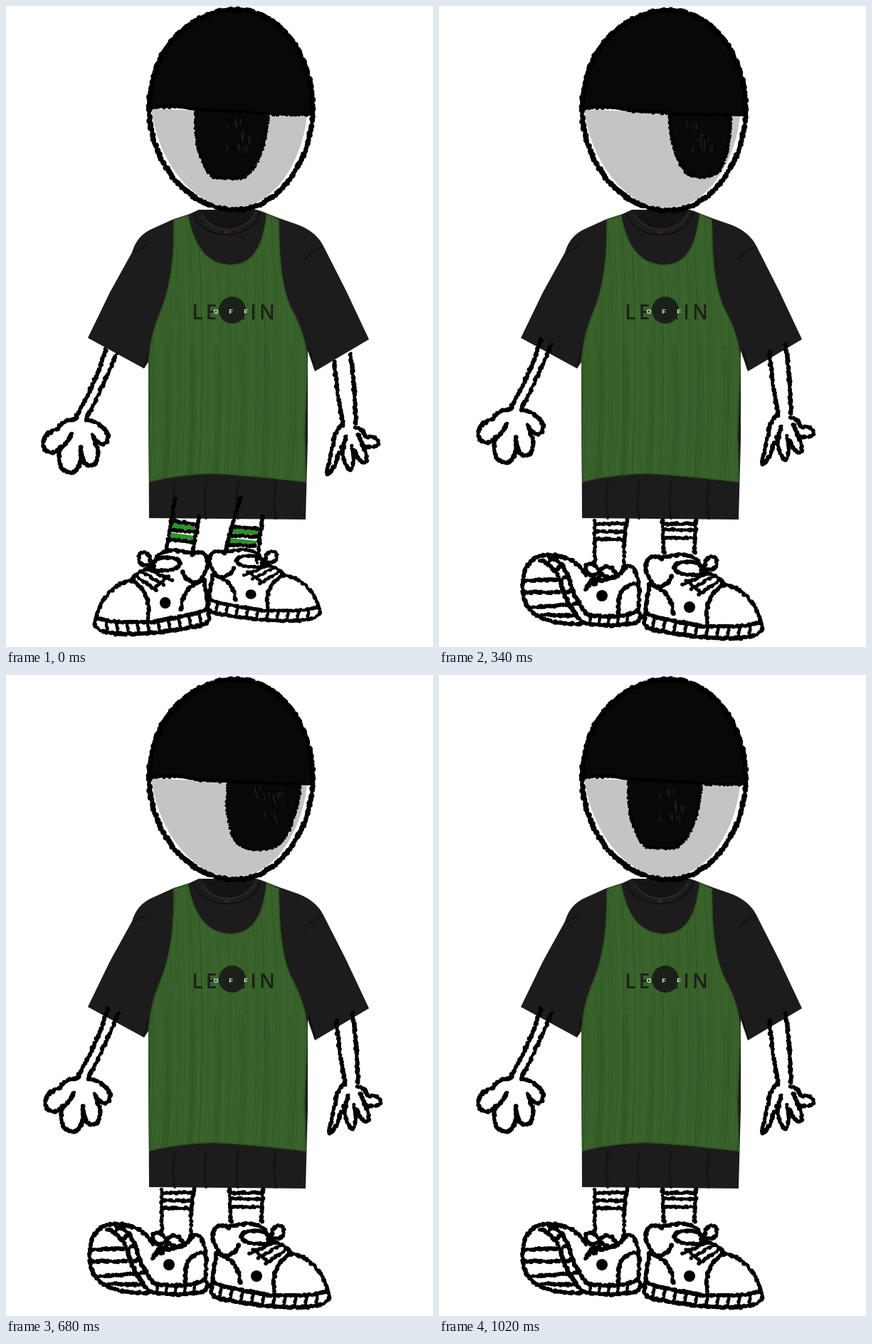
An HTML page with a canvas for the animation above (1190 ms loop, 600 by 900 pixels).

```html
<!DOCTYPE html>
<html lang="en">
<head>
<meta charset="utf-8">
<title>Walking figure</title>
<style>
html, body { margin: 0; width: 100%; height: 100%; overflow: hidden; background: #fff; }
canvas { display: block; width: 600px; height: 900px; }
</style>
</head>
<body>
<canvas id="stage" width="600" height="900"></canvas>
<script>
const STEP = 170;
const INK = '#000', CLOTH = '#1d1c1c', GREEN = '#3b642c', GREY = '#c4c4c2';
const PRINT = '#1b211a', SOCK = '#2f8f2d', HAIR = '#080808';

const stage = document.getElementById('stage').getContext('2d');
const probe = document.createElementNS('http://www.w3.org/2000/svg', 'path');

function randomizer(seed) {
  return () => {
    seed = (seed * 1664525 + 1013904223) >>> 0;
    return seed / 4294967296;
  };
}

function fill(g, d, color) {
  g.fillStyle = color;
  g.fill(new Path2D(d));
}

function line(g, d, color, width) {
  g.strokeStyle = color;
  g.lineWidth = width;
  g.stroke(new Path2D(d));
}

function dot(g, x, y, r, color) {
  g.fillStyle = color;
  g.beginPath();
  g.arc(x, y, r, 0, 7);
  g.fill();
}

// Crayon stroke: overlapping blobs of uneven size along each subpath.
function crayon(g, d, width = 6) {
  for (const part of d.match(/M[^M]+/g)) {
    probe.setAttribute('d', part);
    const length = probe.getTotalLength();
    const rnd = randomizer(Math.round(length * 97));
    for (let s = 0; s <= length; s += 2) {
      const p = probe.getPointAtLength(s);
      const r = width * (0.34 + 0.24 * rnd());
      dot(g, p.x + (rnd() - 0.5) * 2, p.y + (rnd() - 0.5) * 2, r, INK);
    }
  }
}

function placed(g, matrix, draw) {
  g.save();
  g.transform(...matrix);
  draw(g);
  g.restore();
}

// ---------- shirt ----------
const SHIRT = `M258 292 L271 286 L352 286 Q360 288 366 291
  L384 298 L410 307 Q436 317 446 337 L478 400 L510 468 L434 513 L424 484
  L424 610 L421 721 L201 719 L200 500 L194 509 L115 466
  L146 402 L177 346 Q184 322 205 313 L236 299 Z`;
const BIB = `M235 300 L256 293 C262 322 274 363 317 363 C355 362 362 322 366 291 L384 300
  C384 350 387 395 402 426 C414 449 423 470 424 502 L420 600 L422 669
  C380 664 325 658 290 657 C252 658 222 663 201 669 L200 502 C201 474 207 452 217 428
  C230 398 237 350 235 300 Z`;

function drawBib(g) {
  g.save();
  g.clip(new Path2D(BIB));
  fill(g, 'M190 280 H435 V680 H190 Z', GREEN);
  const rnd = randomizer(7);
  for (let x = 160; x < 470; x += 4) {
    line(g, `M${x} 285 Q${x + 14} 480 ${x + 2} 680`, `rgba(20,45,14,${0.2 * rnd()})`, 2);
  }
  for (let i = 0; i < 6; i++) {
    const x = 226 + i * 35;
    line(g, `M${x} 480 Q${x + 6} 590 ${x - 5} 680`, 'rgba(20,40,12,.09)', 9);
  }
  line(g, BIB, '#2d5122', 3);
  g.restore();
}

function drawPrint(g) {
  g.textAlign = 'center';
  g.fillStyle = PRINT;
  g.font = '600 28px "Open Sans", sans-serif';
  [...'LEFRIN'].forEach((c, i) => g.fillText(c, 269 + i * 19.6, 440));
  dot(g, 318, 427, 19, PRINT);
  g.fillStyle = '#e4e9e2';
  g.font = 'bold 9px "Liberation Sans", sans-serif';
  [...'OFF'].forEach((c, i) => g.fillText(c, 295 + i * 21, 432));
}

function drawShirt(g) {
  fill(g, SHIRT, CLOTH);
  line(g, 'M180 346 Q190 342 196 336 M194 506 L205 470 M444 338 Q428 345 420 356 M434 510 L426 480',
    '#121112', 2);
  line(g, 'M264 292 C274 330 345 332 357 291', '#111011', 2);
  fill(g, 'M274 288 L350 288 C342 322 286 324 274 288 Z', '#151414');
  line(g, 'M276 294 C292 322 336 320 350 291', '#2c2929', 2);
  fill(g, 'M307 316 H314 V319 H307 Z', '#4a2022');
  for (const x of [237, 281, 326, 379]) {
    line(g, `M${x} 670 Q${x - 4} 695 ${x} 719`, '#151415', 4);
  }
  drawBib(g);
  drawPrint(g);
}

// ---------- head ----------
const HEAD = `M201 146 C200 66 256 6 324 6 C390 7 432 76 431 146
  C429 222 382 287 322 287 C256 287 202 220 201 146 Z`;
const EYE = `M204 145 L270 148 L335 153 L423 155 C418 203 394 253 359 273
  C335 287 302 287 278 272 C241 250 211 202 204 145 Z`;
const CROWN = `M200 144 L240 144 L272 149 L335 152 L372 154 L431 155
  C432 74 389 8 324 7 C257 7 200 66 200 144 Z`;
const PUPILS = {
  front: 'M267 146 C263 180 269 212 285 235 Q291 243 298 243 L331 243 C351 235 366 200 369 152 Z',
  side: 'M333 152 C326 175 328 208 343 231 C352 241 375 242 386 235 C402 226 411 185 414 153 Z',
  wide: 'M324 152 C324 185 331 213 346 233 C358 243 381 243 391 234 C406 217 410 185 410 153 Z',
  low: 'M312 150 C308 185 311 213 324 236 C339 248 371 248 383 238 C401 223 411 185 414 153 Z'
};
const SCRATCHES = {
  front: [326, 176, 14], side: [383, 178, 5], wide: [370, 178, 14], low: [372, 176, 14]
};

function drawHead(g, look) {
  fill(g, HEAD, '#fff');
  fill(g, EYE, GREY);
  fill(g, CROWN, HAIR);
  crayon(g, 'M204 143 L240 142 L272 147 L335 151', 5);
  if (look === 'front') crayon(g, 'M372 153 L424 154', 4);
  fill(g, PUPILS[look], HAIR);
  crayon(g, PUPILS[look], 4);
  const [x, y, count] = SCRATCHES[look];
  const rnd = randomizer(x * 31);
  for (let i = 0; i < count; i++) {
    const px = x + (rnd() - 0.5) * 44, py = y + (rnd() - 0.5) * 46;
    line(g, `M${px} ${py} l${rnd() * 3 - 1} ${4 + rnd() * 7}`, '#2a2a2a', 1);
  }
  crayon(g, HEAD, 7);
}

// ---------- arms ----------
const ARMS = `M140 482 Q128 525 97 580 M155 489 Q138 530 112 581
  M97 581 C84 581 74 587 74 594 C58 596 47 611 54 622 C60 630 70 628 77 620 Q88 612 92 599
  M77 619 C71 638 78 655 90 655 C103 655 106 638 105 618
  M105 628 C109 648 121 650 127 639 C131 628 128 616 122 604
  M122 602 C130 620 145 618 143 603 C139 590 127 582 112 582
  M461 500 Q466 548 474 589 M484 487 Q489 530 492 588
  M474 589 C466 591 463 599 461 609 L450 658 C460 654 465 641 468 626
  M472 620 C474 640 480 650 485 653 C490 643 488 632 486 618
  M488 622 C494 636 501 645 507 640 C508 631 503 622 499 612
  M501 617 C514 623 526 618 522 610 Q516 603 506 606 Q502 592 491 592
  M478 604 L473 624 M495 601 L499 612`;

// ---------- legs ----------
const TOE_SHOE = `M142 862 C146 836 166 815 192 808 C212 816 223 840 216 864
  M142 862 C170 868 210 870 240 864 C265 860 290 855 304 848
  M141 864 C136 880 158 884 190 884 C230 883 280 876 301 869 C307 862 306 854 304 848
  C304 830 300 816 296 803
  M192 808 L204 797 L226 788 M222 787 C229 775 246 774 262 780 C268 790 255 795 240 794
  C230 797 222 793 222 787 M228 777 C238 764 258 764 281 771
  M220 786 C206 792 201 777 205 771 C213 765 220 772 220 784
  M282 772 C290 764 305 770 303 785 C301 800 295 806 290 812 C280 814 272 806 266 795
  M300 808 C280 812 267 822 265 850`;
const TOE_LACES = `M198 801 L229 823 M208 796 L240 815 M217 793 L252 808 M226 819 L248 802`;
const SOLE_SHOE = `M321 797 C314 814 315 836 318 852 C335 862 365 862 387 857
  M318 852 C312 858 313 868 322 869 C350 875 375 873 395 868
  M322 814 C340 817 348 830 344 858
  M321 797 C326 786 336 788 340 797 C350 808 366 811 382 808
  M347 802 C352 788 368 787 372 797 C364 807 354 808 347 802
  M372 797 C380 780 393 785 391 797 C385 803 378 803 372 797
  M370 802 L380 816 M380 806 L391 823
  M384 861 C402 846 409 826 415 806 C420 790 430 781 443 776
  M396 868 C411 852 421 832 426 813 C432 795 442 785 456 781
  M390 802 C402 782 420 774 445 774 C474 776 482 798 479 828
  C474 862 440 872 396 870
  M432 808 L476 810 M427 826 L478 826 M414 844 L470 847 M404 859 L454 858
  M403 841 L414 848 M411 823 L421 829 M417 804 L428 811 M424 788 L435 797 M438 778 L445 789`;
const SOCKS = `M237 722 L239 768 M284 722 L282 768 M334 722 Q339 758 338 790 M379 722 L379 784
  M238 727 H282 M238 736 L282 735 M239 747 H282
  M336 727 H378 M338 738 H378 M339 749 L378 748`;
const GREEN_BANDS = `M232 724 L269 729 L267 737 L230 734 Z M229 739 L265 744 L263 752 L227 748 Z
  M317 732 L355 735 L354 743 L315 741 Z M314 747 L353 751 L351 758 L312 755 Z`;
const BAND_LINES = `M238 690 L232 724 L225 766 M272 716 L262 768 M232 723 L269 728
  M231 736 L267 739 M228 749 L264 753
  M330 690 L319 724 L308 768 M361 716 L352 782 M317 731 L355 734
  M315 743 L354 745 M312 756 L351 758`;

function drawToeShoe(g) {
  crayon(g, TOE_SHOE);
  crayon(g, TOE_LACES, 5);
  for (let x = 156; x < 302; x += 15) {
    crayon(g, `M${x} ${867 - Math.max(0, x - 215) * 0.17} l2 14`, 4.5);
  }
  dot(g, 242, 840, 8, INK);
}

function drawSoleShoe(g) {
  crayon(g, SOLE_SHOE);
  for (let x = 331; x < 385; x += 13) crayon(g, `M${x} 859 l2 11`, 4.5);
  dot(g, 368, 831, 8, INK);
}

const LEGS = {
  stand(g) {
    fill(g, GREEN_BANDS, SOCK);
    crayon(g, BAND_LINES, 5.5);
    placed(g, [0.97, 0, 0, 1, -11, -2], drawToeShoe);
    placed(g, [-0.95, 0, 0, 0.85, 574, 112], drawToeShoe);
  },
  right(g) {
    crayon(g, SOCKS, 5.5);
    drawToeShoe(g);
    drawSoleShoe(g);
  },
  left(g) {
    placed(g, [-1, 0, 0, 1, 598, 0], c => crayon(c, SOCKS, 5.5));
    placed(g, [-1, 0, 0, 1, 594, 4], drawToeShoe);
    placed(g, [-1, 0, 0, 1, 597, -3], drawSoleShoe);
  }
};

// ---------- animation ----------
const POSES = [
  ['front', 'stand'], ['side', 'right'], ['wide', 'left'], ['side', 'right'],
  ['low', 'left'], ['side', 'right'], ['front', 'left']
];

function render([look, legs]) {
  const canvas = document.createElement('canvas');
  canvas.width = 600;
  canvas.height = 900;
  const g = canvas.getContext('2d');
  g.lineCap = g.lineJoin = 'round';
  fill(g, 'M0 0 H600 V900 H0 Z', '#fff');
  drawShirt(g);
  const raised = legs === 'left';
  placed(g, [1, 0, 0, 1, raised ? 3 : 0, raised ? -14 : 0], c => crayon(c, ARMS));
  LEGS[legs](g);
  placed(g, [1, 0, 0, 1, 0, legs === 'stand' ? -1 : 0], c => drawHead(c, look));
  return canvas;
}

const pictures = POSES.map(render);
const start = performance.now();

function tick() {
  const elapsed = Math.max(0, performance.now() - start);
  stage.drawImage(pictures[Math.floor(elapsed / STEP) % pictures.length], 0, 0);
  requestAnimationFrame(tick);
}
tick();
</script>
</body>
</html>
```
